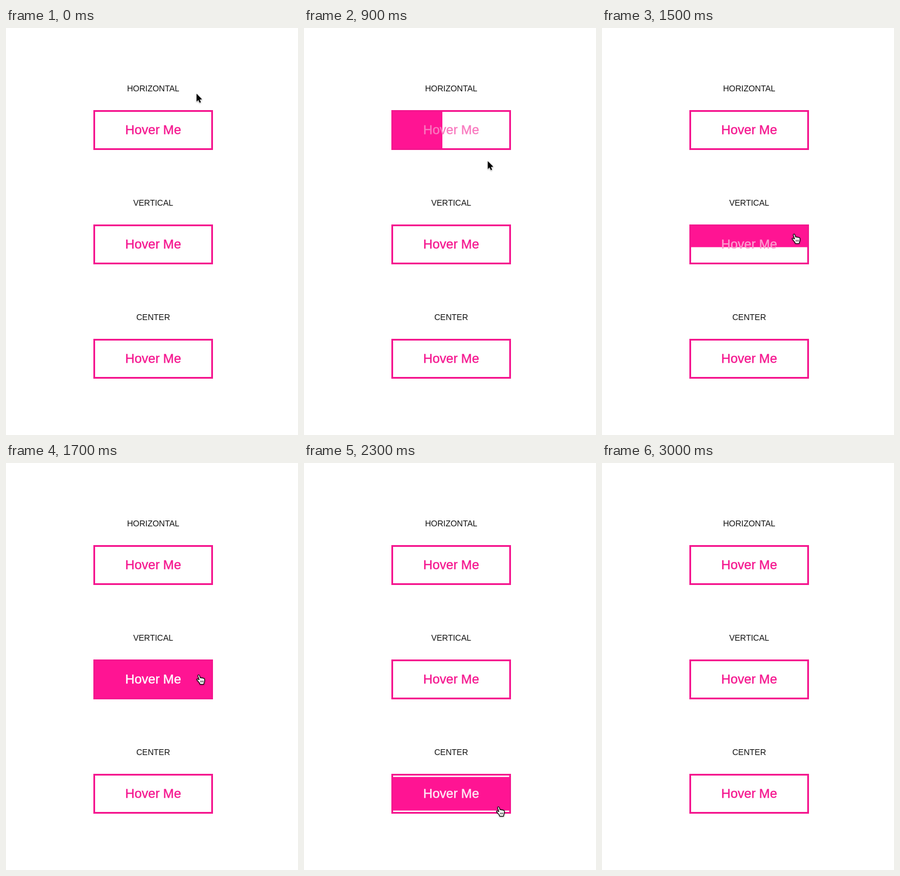
These frames come from a looping animation (498 px wide and 694 px high, 3.6 s). An HTML page:

```html
<!DOCTYPE html>
<html lang="en">
<head>
<meta charset="utf-8">
<title>Hover fills</title>
<style>
  html, body { margin: 0; width: 100%; height: 100%; overflow: hidden; background: #fff; }
  svg { display: block; width: 498px; height: 694px; }
  text { font-family: "Liberation Sans", Arial, sans-serif; text-anchor: middle; }
  .label { font-size: 14px; fill: #111; }
  .caption { font-size: 22px; stroke: currentColor; stroke-width: .4; fill: currentColor; }
  .frame { fill: none; stroke: #f5178f; stroke-width: 3; }
  .fill { fill: #ff1493; }
  #arrow { fill: #000; stroke: #fff; paint-order: stroke; }
  #hand { fill: #fff; stroke: #000; stroke-width: 1.1; stroke-linejoin: round; }
  #cursor { filter: drop-shadow(0 1px 1px rgba(0, 0, 0, .35)); }
</style>
</head>
<body>
<svg viewBox="0 0 498 694">
  <g id="buttons"></g>
  <g id="cursor">
    <path id="arrow" d="M0 0V13.5L3 10.8 5.2 15.6 7.4 14.6 5.3 10 9.4 9.6Z"/>
    <g id="hand" transform="translate(-4 -1) scale(1.05)">
      <path d="M5.2 9L3.2 3.2C2.6 1 5 .4 5.7 2.4L7 6.2C7.5 5.2 9.2 5.4 9.4 6.6 10 5.7 11.5 6 11.8 7 12.6 6.4 14 7 14 8.5V11C14 13.5 12.8 14 12.6 16.5H6.6C6.2 14 4.2 12.5 2 10 .3 8 2 7 3.4 8.4Z"/>
      <path d="M7.6 10.5v3m2-3v3m2-3v3" stroke-width=".8"/>
    </g>
  </g>
</svg>
<script>
const LOOP = 3600, STEP = 100, FADE = 300;
const LEFT = 149, TOP = 140, PITCH = 195, WIDTH = 204, HEIGHT = 68, BORDER = 3;
const INNER_W = WIDTH - 2 * BORDER, INNER_H = HEIGHT - 2 * BORDER;

const buttons = [
  { name: 'HORIZONTAL', on: 320, off: 800 },
  { name: 'VERTICAL', on: 1400, off: 1800 },
  { name: 'CENTER', on: 2100, off: 2700 }
];

// The pointer glides to each stop in turn
const stops = [
  { at: 100, x: 325, y: 112 },
  { at: 500, x: 307, y: 189 },
  { at: 1100, x: 314, y: 230 },
  { at: 1700, x: 328, y: 361 },
  { at: 2100, x: 333, y: 534 },
  { at: 2300, x: 331, y: 586 },
  { at: 2700, x: 331, y: 586 },
  { at: 3000, x: 384, y: 690 }
];

// The picture rests for a moment at these times
const RESTS = [1700, 2500], REST = 300;

const $ = id => document.getElementById(id);
const lerp = (a, b, k) => a + (b - a) * k;

function set(el, attrs) {
  for (const key in attrs) el.setAttribute(key, attrs[key]);
  return el;
}

function add(parent, tag, attrs, text = '') {
  const el = set(document.createElementNS('http://www.w3.org/2000/svg', tag), attrs);
  el.textContent = text;
  return parent.appendChild(el);
}

buttons.forEach((b, i) => {
  const g = add($('buttons'), 'g', { transform: `translate(${LEFT} ${TOP + i * PITCH})` });
  add(g, 'text', { class: 'label', x: WIDTH / 2, y: -32.5 }, b.name);
  b.fill = add(g, 'rect', { class: 'fill' });
  add(g, 'rect', {
    class: 'frame', x: BORDER / 2, y: BORDER / 2, width: WIDTH - BORDER, height: HEIGHT - BORDER
  });
  b.caption = add(g, 'text', { class: 'caption', x: WIDTH / 2, y: 41 }, 'Hover Me');
});

// The CSS "ease" curve, solved by bisection
function ease(p) {
  if (p <= 0) return 0;
  if (p >= 1) return 1;
  let lo = 0, hi = 1, s = .5;
  for (let i = 0; i < 20; i++) {
    s = (lo + hi) / 2;
    if (.75 * s * (1 - s) + s ** 3 < p) lo = s; else hi = s;
  }
  return .3 * s * (1 - s) ** 2 + 3 * s * s * (1 - s) + s ** 3;
}

function pointer(t) {
  let { x, y } = stops[0];
  for (let i = 1; i < stops.length; i++) {
    const from = stops[i - 1], to = stops[i];
    if (t < from.at) break;
    const k = ease((t - from.at) / (to.at - from.at));
    x = lerp(from.x, to.x, k);
    y = lerp(from.y, to.y, k);
  }
  return { x, y };
}

function drawButton(b, i, t) {
  const level = ease((t - b.on) / FADE) - ease((t - b.off) / FADE);
  const width = i === 0 ? INNER_W * level : INNER_W;
  const height = i === 0 ? INNER_H : INNER_H * level;
  const y = BORDER + (i === 2 ? (INNER_H - height) / 2 : 0);
  set(b.fill, { x: BORDER, y, width, height });
  b.caption.style.color = `rgb(${lerp(245, 255, level)} ${lerp(23, 255, level)} ${lerp(143, 255, level)})`;
}

function draw(now) {
  let t = Math.floor((now % LOOP) / STEP) * STEP;
  for (const rest of RESTS) if (t > rest && t < rest + REST) t = rest;

  buttons.forEach((b, i) => drawButton(b, i, t));

  const { x, y } = pointer(t);
  const over = y >= TOP && (y - TOP) % PITCH < HEIGHT;
  set($('cursor'), { transform: `translate(${x} ${y})` });
  $('cursor').style.display = t < 3000 ? '' : 'none';
  $('hand').style.display = over ? '' : 'none';
  $('arrow').style.display = over ? 'none' : '';
}

const start = performance.now();
function tick() {
  draw(performance.now() - start);
  requestAnimationFrame(tick);
}
tick();
</script>
</body>
</html>
```
